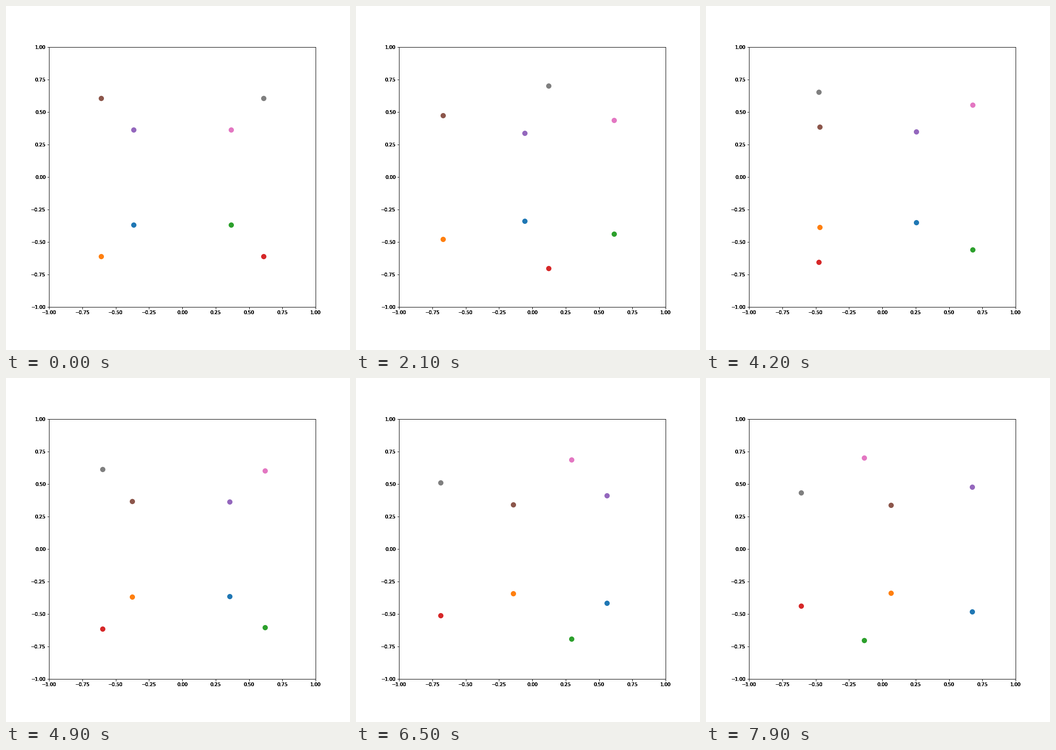
Recreate the animation shown at these times as a matplotlib script. Size 720 px wide and 720 px high, loop 8000 ms.

```python
import numpy as np
import matplotlib.pyplot as plt
from matplotlib.animation import FuncAnimation

FRAMES, STEP = 80, 100      # frames per loop, ms per frame
QUARTER = 4975              # ms between two followers on the shared orbit
LAYERS = 7                  # stacked axes give the heavy tick labels

# Fourier terms of the orbit, symmetric about its top point
SIN_X = np.array([0.6682, 0.1220, 0.0229, 0.0041, 0.0005, 0.0002])
COS_Y = np.array([0.4882, 0.1783, 0.0326, 0.0061, 0.0010])

# Phase of each body at the start, in quarter turns
PHASES = {"C4": 1.5, "C5": 0.5, "C6": 2.5, "C7": -0.5}
MIRRORS = ["C0", "C1", "C2", "C3"]


def orbit(angle):
    x = -SIN_X @ np.sin(angle * np.arange(1, len(SIN_X) + 1))
    y = COS_Y @ np.cos(angle * np.arange(len(COS_Y)))
    return x, y


def make_axes(fig):
    ax = fig.add_axes([0.125, 0.125, 0.775, 0.755])
    ax.set(xlim=(-1, 1), ylim=(-1, 1))
    ax.set_xticks(np.linspace(-1, 1, 9))
    ax.set_yticks(np.linspace(-1, 1, 9))
    ax.patch.set_visible(False)
    return ax


def make_dot(ax, color):
    return ax.plot([], [], "o", color=color, markersize=10)[0]


plt.rcParams.update({"font.family": "DejaVu Sans", "font.size": 10})
fig = plt.figure(figsize=(10, 10), dpi=72, facecolor="white")
ax = [make_axes(fig) for _ in range(LAYERS)][-1]
upper = [make_dot(ax, c) for c in PHASES]
lower = [make_dot(ax, c) for c in MIRRORS]


def update(frame):
    turn = frame * STEP / QUARTER
    for top, bottom, phase in zip(upper, lower, PHASES.values()):
        x, y = orbit(np.pi / 2 * (phase + turn))
        top.set_data([x], [y])
        bottom.set_data([x], [-y])
    return upper + lower


anim = FuncAnimation(fig, update, frames=FRAMES, interval=STEP,
                     repeat=True, repeat_delay=0)
plt.show()
```
